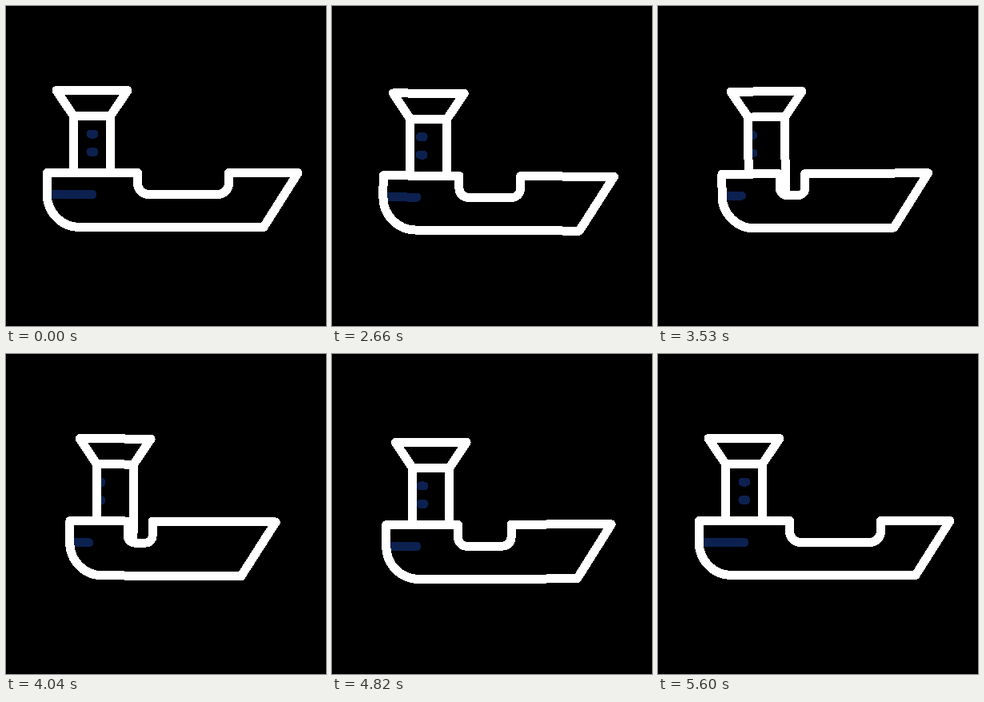
Recreate the animation shown at these times as an HTML page. Size 400x400 px, loop 5660 ms.

```html
<!DOCTYPE html>
<html lang="en">
<head>
<meta charset="utf-8">
<title>Ship</title>
<style>
html, body { margin: 0; width: 100%; height: 100%; overflow: hidden; background: #000; }
svg { display: block; width: 100vw; height: 100vh; }
path { fill: none; stroke-width: 11; stroke-linecap: round; stroke-linejoin: round; shape-rendering: crispEdges; }
.line { stroke: #fff; }
.mark { stroke: #0c2150; }
#body { fill: #000; }
</style>
</head>
<body>
<svg viewBox="0 0 400 400">
  <g id="ship">
    <path id="ports" class="mark" d="M106 160h4M106 182.500h4"/>
    <path id="tower" class="line" d="M63 105.500H152L130.500 137.500H84.500ZM84.500 137.500V232M130.500 137.500V232"/>
    <path id="body"/>
    <path id="stripe" class="mark"/>
    <path id="hull" class="line"/>
  </g>
</svg>
<script>
const LOOP = 5660, START = 2000, END = 5600, HALF = (END - START) / 2;
const el = id => document.getElementById(id);
const [ship, ports, tower, body, stripe, hull] =
  ['ship', 'ports', 'tower', 'body', 'stripe', 'hull'].map(el);
const set = (node, name, value) => node.setAttribute(name, value);

// Cubic bezier easing (.33, 0, .4, 1)
function ease(x) {
  let lo = 0, hi = 1;
  for (let i = 0; i < 24; i++) {
    const u = (lo + hi) / 2, v = 1 - u;
    if (3 * u * v * (v * 0.33 + u * 0.4) + u * u * u < x) lo = u; else hi = u;
  }
  return lo * lo * (3 - 2 * lo);
}

function draw(time) {
  const t = Math.min(Math.max(time % LOOP, START), END) - START;
  const k = ease(1 - Math.abs(t / HALF - 1));
  const phase = 2 * Math.PI * t / HALF;
  const bob = 2.45 * (1 - Math.cos(phase));
  const tilt = 0.4 * Math.sin(phase);

  const shift = 29.2 * k;
  const stern = 51.3 + shift, bow = 365 - 28.2 * k;
  const left = 164.5 - 12.5 * k, right = 278.5 - 97 * k;
  const r = 14 - 5 * k;

  set(ship, 'transform', `translate(0 ${bob}) rotate(${tilt} 208 195)`);
  set(tower, 'transform', `translate(${shift} 0)`);
  set(ports, 'transform', `translate(${9 * k} 0)`);
  set(stripe, 'd', `M${stern + 5} 235.500H${108 - 4 * k}`);

  // The dark body hides the tower legs, which show only inside the notch.
  const outline = `M${stern} 208.500H${left}V${235.5 - r}a${r} ${r} 0 0 0 ${r} ${r}` +
    `H${right - r}a${r} ${r} 0 0 0 ${r} ${-r}V208.500H${bow}L${bow - 43} 276.500` +
    `H${stern + 41}a41 41 0 0 1 -41 -41Z`;
  set(body, 'd', outline);
  set(hull, 'd', outline);
}

function tick() {
  draw(performance.now());
  requestAnimationFrame(tick);
}
tick();
</script>
</body>
</html>
```
